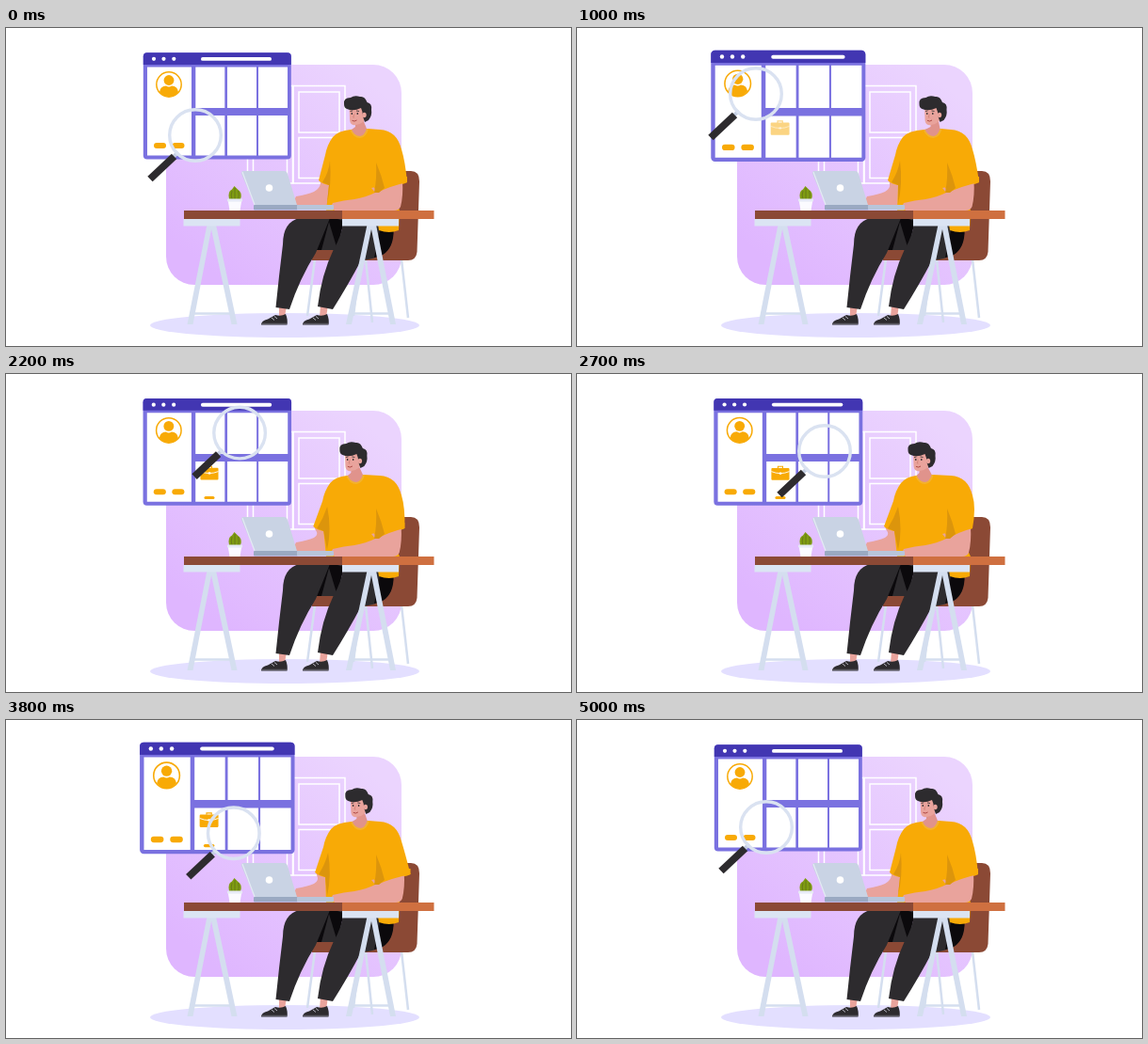
These frames come from a looping animation (600 px wide and 338 px high, 5.1 s). An HTML page with a canvas:

```html
<!DOCTYPE html>
<html lang="en">
<head>
<meta charset="utf-8">
<title>Searching at the desk</title>
<style>
html, body { margin: 0; width: 100%; height: 100%; overflow: hidden; background: #fff; }
canvas { display: block; width: 100vw; height: 100vh; }
</style>
</head>
<body>
<canvas id="stage" width="600" height="338"></canvas>
<script>
const ctx = document.getElementById('stage').getContext('2d');

const LOOP = 5100, CYCLE = 5000, STEP = 100;
const ORANGE = '#f8aa06', SHADE = '#dc950c', SKIN = '#e9a39c', DARK = '#2d2b2e', BLACK = '#0b090c',
  METAL = '#d4deef', BROWN = '#8b4935';

// time, lens x, lens y, head shift, left sleeve shift, right sleeve shift
const KEYS = [
  [0, 201, 114, 0, 0, 0],
  [600, 187, 90, 3, -1, 0],
  [1000, 190, 70, 4.5, -2, 1],
  [1700, 226.5, 50.5, 0, -5, 2],
  [2700, 263, 82, -7.5, -6, -6],
  [3400, 254, 113, 0, -6, 4],
  [4300, 224, 123, 1.5, -1, 1]
];

const clamp = v => Math.max(0, Math.min(1, v));
const ramp = (t, from, to) => clamp((t - from) / (to - from));

function keyAt(i) {
  const n = KEYS.length, turn = Math.floor(i / n);
  const key = KEYS[i - turn * n].slice();
  key[0] += turn * CYCLE;
  return key;
}

// Smooth closed curve through the keys.
function pose(t) {
  let i = 0;
  while (keyAt(i + 1)[0] <= t) i++;
  const [a, b, c, d] = [-1, 0, 1, 2].map(o => keyAt(i + o));
  const span = c[0] - b[0], u = (t - b[0]) / span, u2 = u * u, u3 = u2 * u;
  return b.slice(1).map((p, j) => {
    const k = j + 1;
    const m0 = (c[k] - a[k]) / (c[0] - a[0]) * span;
    const m1 = (d[k] - b[k]) / (d[0] - b[0]) * span;
    return (2 * u3 - 3 * u2 + 1) * p + (u3 - 2 * u2 + u) * m0 +
      (3 * u2 - 2 * u3) * c[k] + (u3 - u2) * m1;
  });
}

// Two swells per cycle, the second a little longer.
function swell(t) {
  const phase = t < 2400 ? t / 2400 : (t - 2400) / 2600;
  return (1 - Math.cos(2 * Math.PI * phase)) / 2;
}

function shape(d, color) {
  ctx.fillStyle = color;
  ctx.fill(new Path2D(d));
}

function line(d, color, width) {
  ctx.strokeStyle = color;
  ctx.lineWidth = width;
  ctx.stroke(new Path2D(d));
}

function box(x, y, w, h, color, radius = 0) {
  ctx.fillStyle = color;
  ctx.beginPath();
  ctx.roundRect(x, y, w, h, radius);
  ctx.fill();
}

function oval(x, y, rx, ry, color) {
  ctx.fillStyle = color;
  ctx.beginPath();
  ctx.ellipse(x, y, rx, ry, 0, 0, 7);
  ctx.fill();
}

function ring(x, y, r, color, width) {
  ctx.strokeStyle = color;
  ctx.lineWidth = width;
  ctx.beginPath();
  ctx.arc(x, y, r, 0, 7);
  ctx.stroke();
}

function drawRoom() {
  ctx.fillStyle = '#fff';
  ctx.fillRect(0, 0, 600, 338);
  oval(296, 316, 143, 13, '#e3dfff');
  const wall = ctx.createLinearGradient(390, 60, 225, 265);
  wall.addColorStop(0, '#ebd4fe');
  wall.addColorStop(1, '#dfb6ff');
  box(170, 39, 250, 234, wall, 30);
  for (const [x, w] of [[256.5, 48], [305, 55]]) {
    ctx.strokeStyle = '#fff';
    ctx.lineWidth = 1.5;
    ctx.strokeRect(x, 61.5, w, 103.5);
    ctx.strokeRect(x + 6, 68, w - 12, 43);
    ctx.strokeRect(x + 6, 116.5, w - 12, 43);
  }
}

function drawChair() {
  line('M328 246L320 306M420 246L427 308M382 246L389 313M376 246L369 306', METAL, 2.5);
  shape('M395 152H430Q439 152 439 163L436.5 238Q435.5 247 427 247H325Q322 241 326 236H395Z', BROWN);
}

function drawShoe(x) {
  shape(`M${x + 15} 305Q${x + 21} 307 ${x + 26} 304Q${x + 28.5} 310 ${x + 27.5} 315.5H${x}Q${x} 311 ${x + 7} 309.5Z`, DARK);
  line(`M${x + 1} 314.3H${x + 27}`, '#777580', 0.8);
  line(`M${x + 11} 308L${x + 14} 310.5M${x + 14} 306.5L${x + 17} 309`, '#d8d8e4', 0.8);
}

function drawLegs() {
  shape('M290 295H298L296 307H290Z M334 295H342L340 307H333Z', SKIN);
  drawShoe(271);
  drawShoe(315);
  shape('M336 200H360L352 236H329Z', BLACK);
  shape('M343 206L352 236H335Z', DARK);
  shape('M352 203H411Q414 233 400 241Q390 246 377 247Q364 272 347 299L331 296Q335 262 348 235Q357 220 358 205Z', DARK);
  shape('M397 215H411.500Q412 233 400 241L391 244Z', BLACK);
  shape('M312 202H344Q336 222 329 239Q312 266 301 299L286.500 297Q290 262 294 230Q294 206 312 202Z', DARK);
}

function drawTorso(l, r, head) {
  const m = head * 0.6 + (l + r) * 0.15, ls = l * 0.5, elbow = r * 0.5;
  // far arm
  shape(`M${333 + l} 161L${345 + l} 164L343 188H308Q305 184 308 179Q320 177 327 174Q333 171 ${334 + l} 165Z`, SKIN);
  shape(`M${366 + m} 108
    Q${353 + ls} 109 ${347 + ls} 116Q${341 + ls} 124 ${339 + ls} 135L${332 + l} 162
    Q${336 + l} 166 ${343 + l} 167L340 194V203H394L396 215Q407 219 417 215L418 194
    L${409 + elbow} 168Q${420 + r} 167 ${426 + r} 164Q424 142 420 129Q415 109 397 108
    L${384 + m} 107Z`, ORANGE);
  shape(`M${344 + ls} 141Q${343 + l} 153 ${336 + l} 164L${343 + l} 167L341 187Q346 165 ${344 + ls} 141Z`, SHADE);
  // near arm
  shape(`M388 170L${421 + elbow} 163Q${422 + elbow} 178 ${419 + elbow} 190Q${417 + elbow} 194 ${412 + elbow} 194
    H349Q344 190 347 186Q359 183 370 182Q382 180 392 175Z`, SKIN);
  shape(`M389 166L400 158L${426 + r} 158V164Q${408 + elbow} 168 394 175Z`, ORANGE);
  shape('M393 143Q394 160 391 175L396 175L402 170Q399 157 393 143Z', SHADE);
  shape(`M${365 + m} 108Q${369 + m} 117 ${376 + m} 117Q${383 + m} 116 ${385 + m} 107Z`, '#f3b22e');
  shape(`M${367 + m} 108Q${370 + m} 115 ${376 + m} 115Q${381 + m} 114 ${383 + m} 107
    L${379 + head} 97H${371 + head}L${371 + head} 105Z`, '#e0938c');
}

function drawHead(dx) {
  ctx.save();
  ctx.translate(dx, 0);
  shape('M364.5 82L383 82Q385 96 379 100Q374 104 368.5 103Q365 102 365 97Z', SKIN);
  shape('M359 81Q358 74 366 74Q370 71 376 73Q381 72 383.5 79Q389 80 388 87Q389 93 385 98L381 100L379 94Q379 89 377 85Q369 89 362 86Q359 85 359 81Z', DARK);
  oval(380.5, 92.5, 2.2, 2.8, SKIN);
  oval(367.3, 91, 0.8, 1, DARK);
  oval(373.3, 91, 0.8, 1, DARK);
  line('M365.5 88.5L368 88M372 88L375 88.5', DARK, 0.8);
  line('M369.8 91.5L368.7 95H370', '#cc7b71', 0.7);
  line('M367.5 98.3Q370 100 372.5 98', '#a9413e', 0.9);
  ctx.restore();
}

function drawTrestle(x, apex) {
  line(`M${x + 7} 303.5H${x + 51}`, METAL, 2.5);
  shape(`M${apex - 4.5} 209H${apex + 1}L${x + 10} 315H${x + 4}Z`, METAL);
  shape(`M${apex - 1} 209H${apex + 5}L${x + 57} 315H${x + 51}Z`, METAL);
  box(x, 203, 60, 7.5, '#dbe4f3');
}

function drawDesk() {
  drawTrestle(188.5, 218);
  drawTrestle(357, 388);
  box(189, 194, 168, 9, BROWN);
  box(357, 194, 97.5, 9, '#cf7040');
}

function drawDeskItems() {
  shape('M252 152H295Q298 152 299 155L309 188H264L250 155Q250 152 252 152Z', '#c9d3e4');
  line('M251 153L264 188', '#e4eaf4', 1.2);
  oval(279.5, 170, 3.8, 3.8, '#fff');
  box(263, 188, 47, 5.5, '#9aa9c2', 1);
  box(309, 188, 39, 5.5, '#b8c5da', 1);
  shape('M237 182Q235 174 240 171.500L242.5 168L246 171.500Q251.500 175 249 182Z', '#7f9c12');
  line('M240 173Q238.5 178 240 182M243 170V182M246.5 173Q248 178 246.5 182', '#66741a', 0.9);
  shape('M235.5 182H250.5L248.5 194H237.5Z', '#fbfbff');
  box(235, 181.5, 16, 3, '#e6eaf5', 1);
}

function drawBriefcase(t) {
  const out = 1 - ramp(t, 4450, 4850);
  ctx.globalAlpha = ramp(t, 800, 1200) * out;
  line('M213.5 100V98.2H218.5V100', ORANGE, 1.1);
  box(206.5, 99.8, 19, 12.7, ORANGE, 1);
  line('M206.5 103.5Q216 107.5 225.5 103.5', '#fff', 0.9);
  box(214.8, 104.3, 2.6, 2.2, '#fff', 0.6);
  ctx.globalAlpha = ramp(t, 1000, 1400) * out;
  box(210.5, 129.8, 11, 3, ORANGE, 1.5);
  ctx.globalAlpha = 1;
}

function drawBrowser(t) {
  const grow = 1 + 0.048 * swell(t);
  ctx.save();
  ctx.translate(224.3, 82.8);
  ctx.scale(grow, grow);
  ctx.translate(-224.3, -82.8);
  box(145.8, 26.3, 157, 113.2, '#7a71e0', 4);
  box(145.8, 26.3, 157, 12.7, '#4236b2', [4, 4, 0, 0]);
  for (const x of [157, 167.5, 178.3]) oval(x, 32.8, 2.1, 2.1, '#fff');
  box(207, 31, 75, 3.8, '#fff', 1.9);
  box(150, 41.5, 47, 94, '#fff');
  for (const x of [201.3, 235, 268]) {
    box(x, 41.5, 31, 43.5, '#fff');
    box(x, 93, 31, 42.5, '#fff');
  }
  ring(173, 60, 13.2, ORANGE, 1.5);
  oval(173, 55.5, 5.4, 5.4, ORANGE);
  shape('M163 68Q164 61.5 170 61.5Q173 63.5 176 61.5Q182 61.5 183 68Q179 73 173 73Q167 73 163 68Z', ORANGE);
  box(157, 122, 13, 6, ORANGE, 3);
  box(176.5, 122, 13, 6, ORANGE, 3);
  drawBriefcase(t);
  ctx.restore();
}

function drawLens(x, y) {
  ctx.save();
  ctx.translate(x, y);
  line('M-18 18L-24 23.5', '#c5cfe2', 4);
  ring(0, 0, 27.3, '#dae2f1', 3.4);
  line('M-22.5 22.5L-48 46.5', DARK, 7.8);
  ctx.restore();
}

function render(t) {
  const [lensX, lensY, head, left, right] = pose(t % CYCLE);
  drawRoom();
  drawChair();
  drawLegs();
  drawTorso(left, right, head);
  drawHead(head);
  drawDesk();
  drawDeskItems();
  drawBrowser(t);
  drawLens(lensX, lensY);
}

const start = performance.now();
function tick() {
  const t = (performance.now() - start) % LOOP;
  render(Math.floor(t / STEP) * STEP);
  requestAnimationFrame(tick);
}
tick();
</script>
</body>
</html>
```
